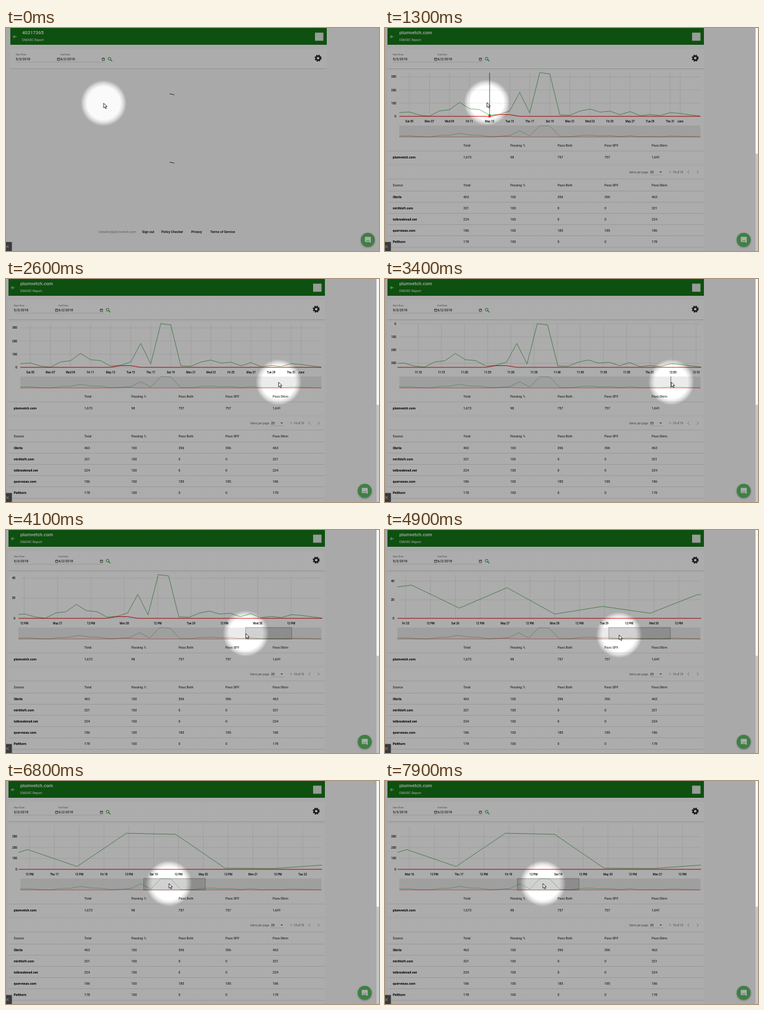
Write an HTML page that moves like this. It is 600 by 359 pixels and loops after 8000 ms.

```html
<!DOCTYPE html>
<html lang="en">
<head>
<meta charset="utf-8">
<title>DMARC Report</title>
<style>
  html, body { margin: 0; width: 100%; height: 100%; overflow: hidden; background: #a9a9a9; }
  svg { display: block; width: 600px; height: 359px; font-family: Roboto, sans-serif; }
  .card { fill: #fff; filter: drop-shadow(0 .8px .7px rgba(0, 0, 0, .5)); }
  .rule { stroke: #d2d2d2; stroke-width: .6; }
  .grid { stroke: #e4e4e4; stroke-width: .7; }
  .pass { fill: none; stroke: #38a041; stroke-width: .7; stroke-linejoin: round; }
  .fail { fill: none; stroke: #f01c1c; stroke-width: 1; }
  .mini path { stroke-width: .6; opacity: .7; }
  .icon { fill: none; stroke: #333; stroke-width: .7; }
  .faint { fill: none; stroke: #888; stroke-width: .7; }
</style>
</head>
<body>
<svg viewBox="0 0 600 359">
  <defs>
    <radialGradient id="spot" gradientUnits="userSpaceOnUse" cx="0" cy="0" r="37">
      <stop offset=".72" stop-opacity="0"/>
      <stop offset=".86" stop-opacity=".13"/>
      <stop offset="1" stop-opacity=".325"/>
    </radialGradient>
    <clipPath id="plot"><rect x="20" y="70" width="488.5" height="74"/></clipPath>
  </defs>
  <rect width="600" height="359" fill="#fafafa"/>
  <g id="bar"></g>
  <g id="loading"></g>
  <g id="report">
    <g id="tables"></g>
    <g id="chart"></g>
  </g>
  <g id="chat">
    <circle cx="577" cy="341" r="11.2" fill="#5cbd64" style="filter:drop-shadow(0 1px 1.5px rgba(0,0,0,.35))"/>
    <path d="M573.300 336.300h7.600q1 0 1 1v9l-2.500-1.700h-6.100q-1 0-1-1v-6.300q0-1 1-1z" fill="#fff"/>
    <path d="M574.200 341.700q2.900 2 5.800 0" fill="none" stroke="#5cbd64" stroke-width=".8"/>
  </g>
  <rect y="344.500" width="9.500" height="15" fill="#555"/>
  <path d="M.2 349.800l4.400 4.400m0-4.400l-4.400 4.400" stroke="#eee" stroke-width=".8"/>
  <g id="pointer">
    <rect x="-700" y="-460" width="1400" height="920" fill="url(#spot)"/>
    <path d="M0 0v7.600l1.800-1.600 1.300 2.900 1.400-.6-1.300-2.800h2.300z" fill="#fff" stroke="#111" stroke-width=".8"/>
  </g>
  <g id="scroll">
    <rect x="596" width="4" height="359" fill="#c6c6c6"/>
    <rect x="596" width="4" height="202.500" fill="#f6f6f6"/>
  </g>
</svg>
<script>
const LOOP = 8000, LOADED = 500, BASE = 142.2, LEFT = 20, RIGHT = 508;
const el = id => document.getElementById(id);

// messages passing per day, first day is 4 May
const passing = [28, 33, 10, 1, 41, 50, 106, 58, 51, 9, 16, 40, 182, 26, 332, 322, 11, 8,
  40, 55, 32, 39, 12, 36, 5, 14, 6, 28, 22, 11, 2];
const failing = passing.map((_, i) => i === 10 || i === 11 ? 13 : 0);

const text = (x, y, s, size = 5.25, more = '') =>
  `<text x="${x}" y="${y + size * .355}" font-size="${size}" ${more}>${s}</text>`;
const line = (x1, y1, x2, y2, cls) =>
  `<path class="${cls}" d="M${x1} ${y1}L${x2} ${y2}"/>`;
const bold = 'font-weight="700"', medium = 'font-weight="500"', soft = 'fill="#666"';

// keys are [time, value, value, ...]
function track(keys, t, ease = u => u) {
  const i = keys.findIndex(k => k[0] > t);
  if (i < 0) return keys[keys.length - 1].slice(1);
  if (i === 0) return keys[0].slice(1);
  const a = keys[i - 1], b = keys[i], u = ease((t - a[0]) / (b[0] - a[0]));
  return a.slice(1).map((v, j) => v + (b[j + 1] - v) * u);
}
const smooth = u => u * u * (3 - 2 * u);

const cursorKeys = [[0, 157, 121], [600, 157, 121], [1300, 164, 120], [2000, 321, 167],
  [2800, 460, 166], [3400, 460.5, 166], [3500, 460, 166], [4400, 360, 167], [4900, 376.5, 169],
  [5200, 400, 169], [6000, 307, 165], [7000, 257, 165], [7900, 254, 165]];
const brushKeys = [[3200, 459.287, 460.024], [3500, 459.287, 460.024], [4400, 360, 459],
  [5200, 360, 459], [6000, 268, 367], [7000, 216, 315], [7900, 213, 312]];
// plotted line: x of first day, pixels per day, pixels per message
const lineKeys = [[3200, 23, 16.14, .212], [3400, 14, 16.5, .212], [4500, 14, 16.5, .212],
  [4900, -1567.7, 76.7, 1.37], [5020, -1652, 80, 1.5], [6300, -1652, 80, 1.5],
  [6800, -916.6, 79.3, .175]];

function drawBar() {
  const field = (x, label, date) =>
    text(x, 43, label, 3.9, soft) + text(x, 50, date, 5.6) +
    line(x, 55, x + 72, 55, 'rule') +
    `<path class="icon" d="M${x + 67.2} 48.500h3.600v3.800h-3.600zm0 .6h3.600"/>`;
  el('bar').innerHTML =
    '<rect class="card" x="4" y="34" width="509" height="31.500"/>' +
    '<rect class="card" x="4" y="0" width="509" height="27" style="fill:#157618"/>' +
    '<path d="M13.800 14h-5m2.300-2.300l-2.400 2.300 2.400 2.300" fill="none" stroke="#fff" stroke-width=".8"/>' +
    text(23, 7.7, '', 7.6, 'id="title" fill="#fff" ' + medium) +
    text(23, 19, 'DMARC Report', 5.25, 'fill="#fff"') +
    '<rect x="494" y="7.500" width="13.500" height="13" fill="#dfe8df"/>' +
    field(12.5, 'Start Date', '5/3/2018') + field(84.5, 'End Date', '6/2/2018') +
    '<path d="M165.300 51.200l2.500 2.500" stroke="#2c9a35" stroke-width="1.200"/>' +
    '<circle cx="163.500" cy="49.400" r="2.200" fill="none" stroke="#2c9a35"/>' +
    '<g fill="none" stroke="#222"><circle cx="499" cy="48.500" r="4.500" stroke-width="2.200" stroke-dasharray="2.100 1.434"/>' +
    '<circle cx="499" cy="48.500" r="3.200" stroke-width="2.200"/></g>';
}

function drawTables() {
  const cols = [12.5, 126, 201.5, 277.5, 353, 429];
  const row = (y, cells, more) =>
    cells.map((c, i) => text(cols[i], y, c, 5.25, i || more ? more || '' : bold)).join('');
  const heads = ['Total', 'Passing %', 'Pass Both', 'Pass SPF', 'Pass Dkim'];
  const grey = 'fill="#444" ' + medium;
  const sources = [['Obrilo', 463, 100, 396, 396, 463], ['mirthloft.com', 321, 100, 0, 0, 321],
    ['tolbrookmail.net', 224, 100, 0, 0, 224], ['quorvexas.com', 186, 100, 185, 185, 186],
    ['Pelthorn', 178, 100, 0, 0, 178]];
  el('tables').innerHTML =
    '<rect class="card" x="4" y="69" width="509" height="149"/>' +
    '<rect class="card" x="4" y="222" width="509" height="140"/>' +
    row(189, ['', ...heads], grey) + line(4, 198, 513, 198, 'rule') +
    row(208.5, ['plumvetch.com', '1,673', 98, 757, 757, '1,641']) +
    text(393, 232, 'Items per page:', 4.5, soft) + text(426.5, 232, '25', 4.7) +
    line(426, 236.5, 447, 236.5, 'rule') +
    '<path d="M441.500 231h4l-2 2z" fill="#555"/>' +
    text(457, 232, '1 - 19 of 19', 4.5, soft) +
    '<path class="faint" d="M489.300 229.500l-2.500 2.500 2.500 2.500M501.700 229.500l2.500 2.500-2.500 2.500"/>' +
    line(4, 243, 513, 243, 'rule') +
    row(253, ['Source', ...heads], grey) +
    sources.map((s, i) => line(4, 262.5 + 18 * i, 513, 262.5 + 18 * i, 'rule') + row(272 + 18 * i, s)).join('') +
    line(4, 353, 513, 353, 'rule');
}

function drawLoading(t) {
  const spin = y => `<path transform="rotate(${t * .45} 264 ${y + 12})" d="M263 ${y}q4 0 7.500 1.600"
    fill="none" stroke="#2c6b33" stroke-width="1.100"/>`;
  const links = [[219, 'Sign out'], [250, 'Policy Checker'], [298, 'Privacy'], [328.5, 'Terms of Service']];
  el('loading').innerHTML = spin(106) + spin(216) +
    text(149, 328, 'tomelior@plumvetch.com', 5.25, 'fill="#888"') +
    links.map(([x, s]) => text(x, 328, s, 5.25, medium)).join('');
}

const poly = (data, x0, step, k, base) =>
  'M' + data.map((v, i) => `${(x0 + step * i).toFixed(2)} ${(base - v * k).toFixed(2)}`).join('L');

function dayLabel(day) {
  const d = new Date(Math.round((Date.UTC(2018, 4, 4) + day * 864e5) / 6e4) * 6e4);
  const two = n => String(n).padStart(2, '0');
  const hour = d.getUTCHours(), date = d.getUTCDate(), h12 = hour % 12 || 12;
  if (d.getUTCMinutes()) return two(h12) + ':' + two(d.getUTCMinutes());
  if (hour) return two(h12) + (hour < 12 ? ' AM' : ' PM');
  if (date === 1) return 'June';
  const week = d.getUTCDay();
  return (week ? ['', 'Mon', 'Tue', 'Wed', 'Thu', 'Fri', 'Sat'][week] : 'May') + ' ' + two(date);
}

function xAxis(from, to) {
  const span = to - from, px = (RIGHT - LEFT) / span;
  const step = [1 / 288, 1 / 96, 1 / 24, 1 / 8, 1 / 4, 1 / 2, 1].find(s => span / s <= 16) || 2;
  let out = '';
  for (let n = Math.ceil(from / step); n * step <= to; n++) {
    let day = n * step;
    // two-day ticks fall on odd dates and restart on 1 June
    if (step === 2 && day < 28) day++;
    const x = LEFT + (day - from) * px;
    if (day < 0 || x > 506) continue;
    out += line(x, 72, x, BASE, 'grid') + text(x, 150.3, dayLabel(day), 4.5, 'text-anchor="middle" ' + medium);
  }
  return out;
}

function yAxis(top, flipped, end) {
  const step = [5, 10, 20, 50, 100].find(s => top / s <= 4.1);
  let out = '';
  for (let v = 0; v <= top; v += step) {
    const h = v * 70.5 / top, y = flipped ? 72 + h : BASE - h;
    if (!flipped && y < 74) continue;
    out += line(LEFT + 3, y, RIGHT, y, 'grid') + text(end, y, v, 4.7, 'text-anchor="end" ' + medium);
  }
  return out;
}

function drawChart(t, cx, cy) {
  const brushed = t >= 3200;
  const [s, e] = track(brushKeys, t, smooth);
  let from = -.186, to = 30.05, top = 333, flipped = false;
  if (brushed) {
    from = (s - 22.5) / 16.2;
    to = from + (e - s) / 16.2;
    const seen = passing.filter((v, i) => i >= from && i <= to);
    flipped = to - from < 1;
    if (!flipped) top = Math.max(20, 1.21 * Math.max(0, ...seen));
  }
  const x0 = top < 100 ? 20 : 23, w = 507.3 - x0, step = w / 30;
  const [lx, ls, lk] = track(lineKeys, t);
  let out = yAxis(top, flipped, x0 - 5) + xAxis(from, to) +
    `<g clip-path="url(#plot)"><path class="pass" d="${poly(passing, lx, ls, lk, BASE)}"/>
    <path class="fail" d="${poly(failing, lx, ls, ls > 20 ? 0 : lk, BASE)}"/></g>`;
  if (!brushed && cy < 143) {
    const i = Math.round((cx - lx) / ls), x = lx + ls * i;
    out += line(x, 72, x, BASE, 'icon') +
      `<circle cx="${x}" cy="${BASE - passing[i] * lk}" r="1.700" fill="#2c9a35"/>
      <circle cx="${x}" cy="${BASE - failing[i] * lk}" r="1.900" fill="#f01c1c"/>`;
  }
  out += `<g class="mini"><rect x="${x0}" y="157" width="${w}" height="19" fill="#ebebeb"/>
    <path class="pass" d="${poly(passing, x0, step, .055, 175.4)}"/>
    <path class="fail" d="${poly(failing, x0, step, .055, 175.4)}"/></g>`;
  if (brushed) out += `<rect x="${s}" y="157" width="${e - s}" height="18.700" fill="#000"
    fill-opacity=".11" stroke="#666" stroke-width=".5"/>`;
  el('chart').innerHTML = out;
}

function draw(t) {
  const ready = t >= LOADED, [cx, cy] = track(cursorKeys, t, smooth);
  el('bar').setAttribute('transform', `translate(${ready ? 0 : 3})`);
  el('chat').setAttribute('transform', `translate(${ready ? 0 : 5})`);
  el('title').textContent = ready ? 'plumvetch.com' : '40217365';
  for (const id of ['report', 'scroll']) el(id).style.display = ready ? '' : 'none';
  el('loading').style.display = ready ? 'none' : '';
  ready ? drawChart(t, cx, cy) : drawLoading(t);
  el('pointer').setAttribute('transform', `translate(${cx} ${cy})`);
}

drawBar();
drawTables();
const start = performance.now();
function tick() {
  draw((performance.now() - start) % LOOP);
  requestAnimationFrame(tick);
}
tick();
</script>
</body>
</html>
```
